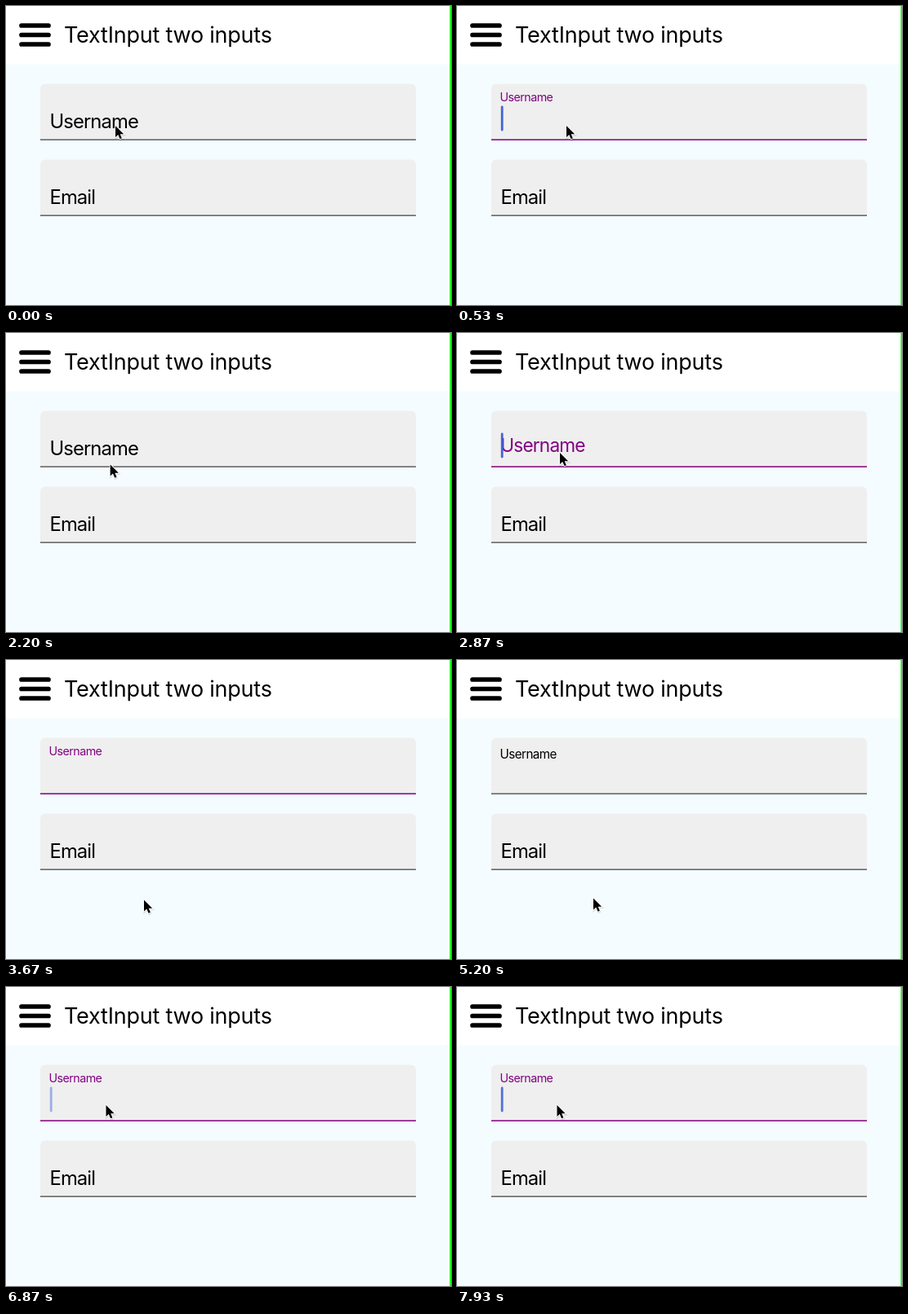
An HTML page that plays this animation: 545 px wide and 367 px high, repeating every 8 s.

```html
<!DOCTYPE html>
<html lang="en">
<head>
<meta charset="utf-8">
<title>TextInput two inputs</title>
<style>
  html, body { margin: 0; width: 100%; height: 100%; overflow: hidden; background: #f5fcff; }
  svg { display: block; width: 545px; height: 367px; }
  text { font-family: Inter, "Liberation Sans", sans-serif; white-space: pre; }
  .title { font-size: 27px; letter-spacing: -0.22px; }
  .label { font-size: 23.8px; letter-spacing: -0.9px; }
</style>
</head>
<body>
<svg viewBox="0 0 545 367" width="545" height="367">
  <defs>
    <path id="arrow" d="M0 0V14L3.3 11.1L5.6 16.2L7.9 15.2L5.7 10.3H10.2Z"/>
  </defs>
  <rect width="545" height="367" fill="#f5fcff"/>
  <rect width="545" height="71.5" fill="#fff"/>
  <path d="M19 24H52M19 35.5H52M19 47H52" stroke="#000" stroke-width="5.7" stroke-linecap="round"/>
  <text class="title" x="71" y="45.3">TextInput two inputs</text>
  <rect x="543.4" width="1.6" height="367" fill="#0cff0c"/>

  <path id="field" d="M42 164.5V102Q42 95.5 48.5 95.5H495.5Q502 95.5 502 102V164.5Z" fill="#efefef"/>
  <use href="#field" y="93"/>
  <rect id="line" x="42" y="163.4" width="460" height="1.5"/>
  <rect x="42" y="256.4" width="460" height="1.5" fill="#5c5f61"/>
  <text class="label" x="53.5" y="243.2">Email</text>
  <text class="label" id="label">Username</text>
  <rect id="caret" x="53.8" y="122.5" width="2.8" height="31" rx="1.4" fill="#4263d9"/>

  <g id="pointer">
    <use href="#arrow" x=".4" y="1.2" stroke="#000" stroke-width="2" opacity=".12"/>
    <use href="#arrow" stroke="#fff" stroke-width="1.8" stroke-linejoin="round" paint-order="stroke"/>
  </g>
</svg>
<script>
  const LOOP = 8000, FPS = 15;
  const FOCUS_MS = 150, BLUR_MS = 180;
  const BLINK_MS = 1000, HIDDEN_MS = 470, FADE_MS = 200;
  const PURPLE = '#800080';

  const $ = id => document.getElementById(id);
  const label = $('label'), line = $('line'), caret = $('caret'), pointer = $('pointer');

  // Focus periods of the first field; the caret blinks from `blink` on
  const spans = [
    { on: 370, off: 1760, blink: 980 },
    { on: 2830, off: 5160, blink: 3300 },
    { on: 5813, off: Infinity, blink: 6300 }
  ];

  // The pointer shuttles between the field and the empty area below
  const home = { x: 134, y: 147 };
  const moves = [
    { from: 1000, to: 1500, x: 143, y: 294.5 },
    { from: 1867, to: 2280, x: 126, y: 147 },
    { from: 2900, to: 3600, x: 169, y: 294.5 },
    { from: 4300, to: 4470, x: 167, y: 292.5 },
    { from: 5240, to: 5670, x: 122.5, y: 143 },
    { from: 5933, to: 6130, x: 122.5, y: 145 }
  ];

  const mix = (a, b, k) => a + (b - a) * k;
  const smooth = u => u * u * (3 - 2 * u);
  const quad = u => u < .5 ? 2 * u * u : 1 - 2 * (1 - u) ** 2;
  const ramp = (t, start, ms, ease) => ease(Math.min(1, Math.max(0, (t - start) / ms)));

  const floatAmount = t => spans.reduce((sum, s) =>
    sum + ramp(t, s.on, FOCUS_MS, quad) - ramp(t, s.off, BLUR_MS, quad), 0);

  function caretAlpha(t, span) {
    if (!span) return 0;
    if (t < span.blink) return 1;
    const phase = (t - span.blink) % BLINK_MS;
    return 1 - ramp(phase, 0, FADE_MS, smooth) + ramp(phase, HIDDEN_MS, FADE_MS, smooth);
  }

  const pointerAt = t => moves.reduce((p, m) => {
    const k = ramp(t, m.from, m.to - m.from, smooth);
    return { x: mix(p.x, m.x, k), y: mix(p.y, m.y, k) };
  }, home);

  function draw(time) {
    // The screen refreshes in steps of 1/15 s
    const t = Math.floor((time + 4) * FPS / 1000) * 1000 / FPS;
    const span = spans.find(s => t >= s.on && t < s.off);
    const up = floatAmount(t);
    const { x, y } = pointerAt(t);

    label.setAttribute('transform',
      `translate(${mix(53.5, 52.4, up)} ${mix(150.2, 117.4, up)}) scale(${mix(1, .6, up)})`);
    label.setAttribute('fill', span ? PURPLE : '#000');
    line.setAttribute('fill', span ? PURPLE : '#5c5f61');
    caret.setAttribute('opacity', caretAlpha(t, span));
    pointer.setAttribute('transform', `translate(${x} ${y})`);
  }

  const start = performance.now();
  function tick() {
    draw((performance.now() - start) % LOOP);
    requestAnimationFrame(tick);
  }
  tick();
</script>
</body>
</html>
```
